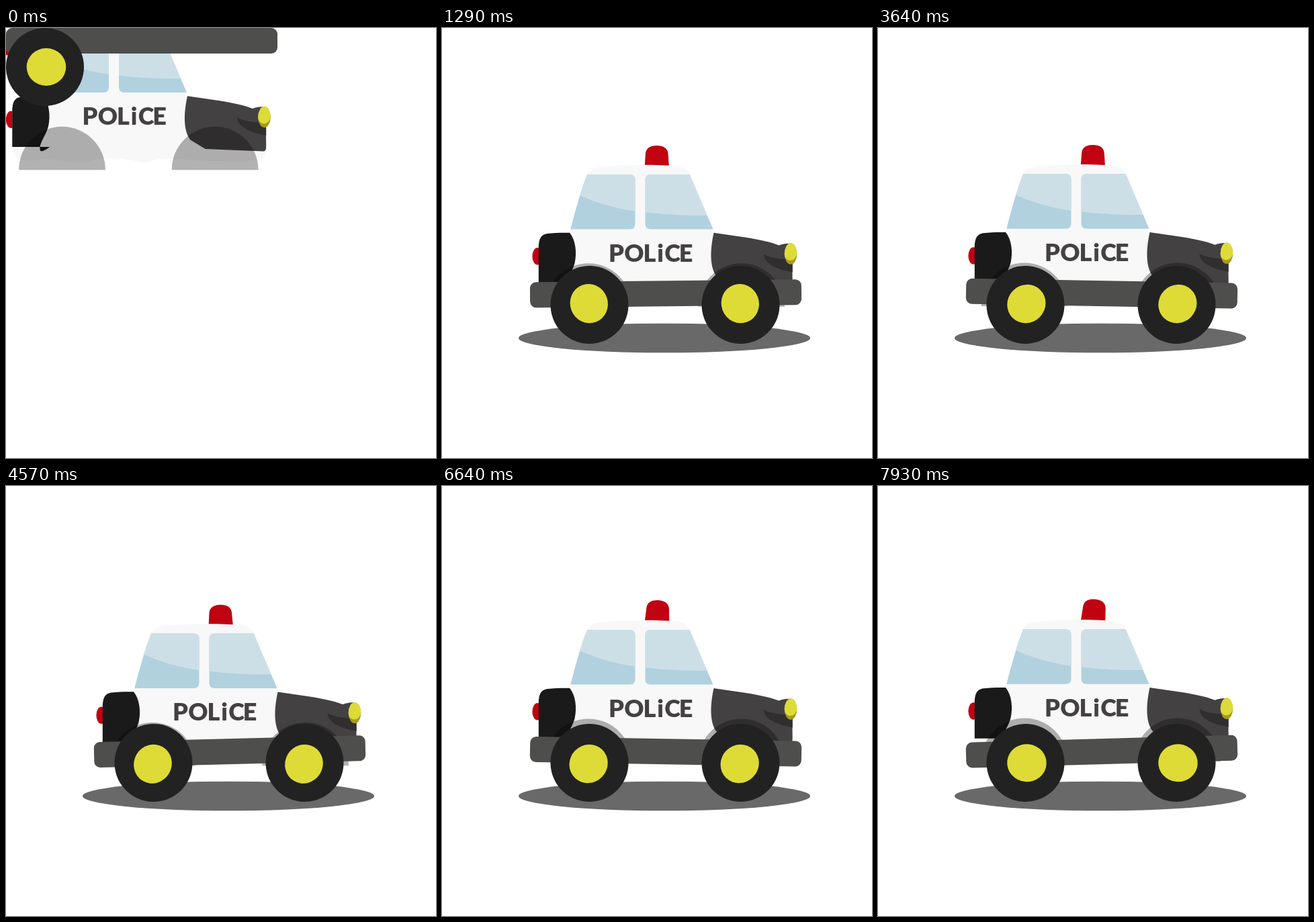
These frames come from a looping animation (640x640 px, 8 s). An HTML page with a canvas:

```html
<!DOCTYPE html>
<html lang="en">
<head>
<meta charset="utf-8">
<title>Police car</title>
<style>
html, body { margin: 0; width: 100%; height: 100%; overflow: hidden; background: #fff; }
canvas { display: block; width: 640px; height: 640px; }
</style>
</head>
<body>
<canvas id="stage" width="640" height="640"></canvas>
<script>
const ctx = document.getElementById('stage').getContext('2d');
const LOOP = 8000, FPS = 14, TAU = Math.PI * 2;
const RED = '#c00311', YELLOW = '#dedb37', DARK = '#444142', WHITE = '#f8f8f8';

const LAMP = new Path2D('M301 215L303.3 187C304 177 312 174.5 320 174.5C329 174.5 336.6 178 337 187L338.5 215Z');
const SHELL = new Path2D(`M191 301L205 250L216 218C220 209 228 207.5 240 206
  C275 203 320 203 350 205.5C362 207.5 366 211 369 218L404 305L521 345V388C521 398 515 400 509 399.5
  C490 403 465 402 450 401.5C420 402 390 397 370 397.5C356 398 350 404 340 403.5C326 403 310 396 290 397
  C270 397 255 404 240 403.5C220 402 200 398 185 399C170 402 144 405 144 381V325L191 305Z`);
const REAR = new Path2D(`M143.8 380.5V328C144 312 148 307.5 157 306C167 304.7 180 304.5 190 304.7
  C199 316 201 334 197.5 350C194.5 362 187 370 185 380.5Z
  M185 380.5H199.5C195 384 189 388 186 386.5C184.5 385 185 382 185 380.5Z`);
const HOOD = new Path2D(`M404.5 304.8C440 310 482 315 501.5 323.5C509 320.5 517 319.8 521 322
  L521.7 380C521.5 386 520 387 517 387L431 383.5L409 370C400 359 397.5 336 404.5 304.8Z`);
const SHADE = new Path2D('M478.5 336.5C490 344 508 343 521.7 346V363.5C504 360 480 354 478.5 336.5Z');
const WINDOWS = new Path2D(`M216 218H279.5Q287.5 218 287.5 226V291.5Q287.5 299.5 279.5 299.5H191.3
  Q197 276 205 250Q210 233 216 218Z
  M310.5 218H368.5L403.5 299.5H310.5Q302.5 299.5 302.5 291.5V226Q302.5 218 310.5 218Z`);
const GLARE = new Path2D('M180 210V238C218 256 250 267.5 288 272.5C330 278 365 279.5 412 278.5V210Z');

const LETTERS = [['P', 259.5], ['O', 286], ['L', 309], ['i', 325], ['C', 343], ['E', 363]];

function fill(path, color) {
  ctx.fillStyle = color;
  ctx.fill(path);
}

function oval(x, y, rx, ry, color) {
  ctx.fillStyle = color;
  ctx.beginPath();
  ctx.ellipse(x, y, rx, ry, 0, 0, TAU);
  ctx.fill();
}

function at(x, y, degrees, draw) {
  ctx.save();
  ctx.translate(x, y);
  ctx.rotate(degrees * Math.PI / 180);
  draw();
  ctx.restore();
}

function clipped(path, draw) {
  ctx.save();
  ctx.clip(path);
  draw();
  ctx.restore();
}

function lamp(dx, dy, tilt) {
  at(320 + dx, 210 + dy, tilt, () => {
    ctx.translate(-320, -210);
    fill(LAMP, RED);
  });
}

function lettering() {
  ctx.fillStyle = DARK;
  ctx.font = '900 36px Lato, "Open Sans", sans-serif';
  ctx.textAlign = 'center';
  for (const [letter, x] of LETTERS) ctx.fillText(letter, x, 347.5);
}

function headlight() {
  const glass = new Path2D();
  glass.ellipse(519, 336, 9.3, 15.7, 0, 0, TAU);
  fill(glass, '#a8991e');
  clipped(glass, () => oval(518.5, 331, 10.5, 15, YELLOW));
}

function arch(x) {
  ctx.fillStyle = 'rgba(0,0,0,.3)';
  ctx.beginPath();
  ctx.arc(x, 414.7, 64.4, Math.PI, TAU);
  ctx.fill();
}

function body(dx, dy) {
  at(dx, dy, 0, () => {
    oval(142, 339.7, 7.6, 12.7, RED);
    fill(SHELL, WHITE);
    fill(REAR, '#1a1a1a');
    fill(HOOD, DARK);
    fill(SHADE, '#302e2e');
    headlight();
    fill(WINDOWS, '#b1d1de');
    clipped(WINDOWS, () => fill(GLARE, '#cddfe6'));
    lettering();
    arch(218);
    arch(445.6);
  });
}

function bumper(x, y, tilt) {
  at(x, y, tilt, () => {
    ctx.fillStyle = '#4e4e4c';
    ctx.beginPath();
    ctx.roundRect(-202, -19, 404, 38, 9);
    ctx.fill();
  });
}

function wheel(x, y, angle) {
  at(x, y, angle, () => {
    oval(0, 0, 58, 58, '#222');
    oval(2, 0, 29.3, 28, YELLOW);
  });
}

// Parts still stacked in the corner before they are placed
function drawUnplaced() {
  lamp(-301.5, -174.5, 0);
  body(-134.5, -203.5);
  bumper(202, 19, 0);
  wheel(58, 58, 0);
}

function drawCar(step) {
  const bounce = TAU * (0.4553 * (step - 18) - 0.27);
  const rock = TAU * (0.35614 * (step - 18) - 0.24);
  const y = -5.2 + 4.65 * (1 - Math.cos(bounce));
  const sway = 0.1 + 0.8 * Math.cos(bounce - TAU * 0.05);
  const spin = 180 * step / FPS + 18;

  oval(331, 461.5, 217, 21.8, '#696969');
  lamp(0, y - 1.5 * sway, 5 * sway);
  body(0, y);
  bumper(333, 395.2, -0.5 - 1.5 * Math.cos(rock));
  wheel(219.5, 412, spin);
  wheel(444.5, 412, spin);
}

function render(now) {
  const step = Math.floor((now % LOOP + 4) * FPS / 1000) % (LOOP * FPS / 1000);
  ctx.clearRect(0, 0, 640, 640);
  if (step === 0) drawUnplaced();
  else drawCar(step);
}

const start = performance.now();
function tick() {
  render(performance.now() - start);
  requestAnimationFrame(tick);
}
tick();
</script>
</body>
</html>
```
